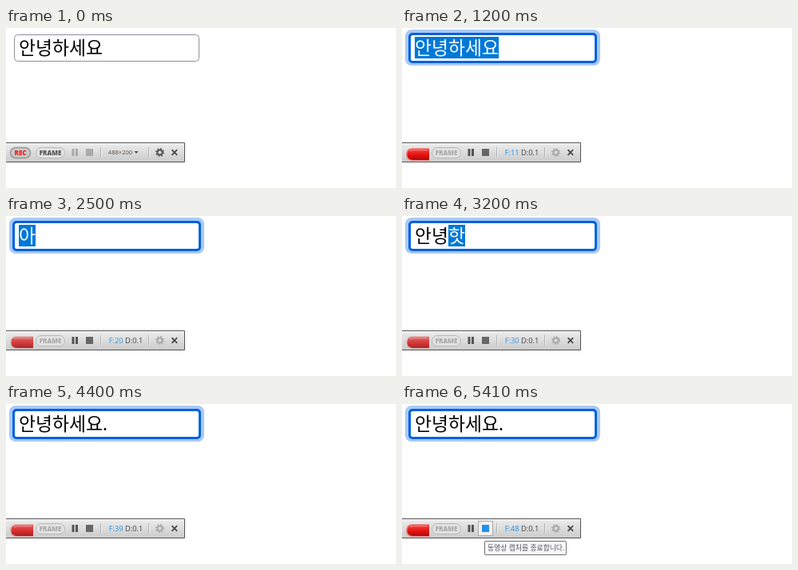
Write an HTML page that moves like this. It is 488 px wide and 200 px high and loops after 5510 ms.

```html
<!DOCTYPE html>
<html lang="ko">
<head>
<meta charset="utf-8">
<title>Text input recording</title>
<style>
  html, body { margin: 0; width: 100%; height: 100%; overflow: hidden; background: #fff; }
  svg { display: block; }
  text { white-space: pre; }
  .hangul { font-family: "Noto Sans CJK KR", "Noto Sans CJK", sans-serif; }
  .small { font-family: "Open Sans", "Noto Sans", sans-serif; text-anchor: middle; }
  .badge { font-family: "Open Sans", sans-serif; font-weight: 800; font-size: 8px; text-anchor: middle; }
</style>
</head>
<body>
<svg width="488" height="200" viewBox="0 0 488 200">
  <defs>
    <linearGradient id="barFill" x2="0" y2="1">
      <stop stop-color="#ededed"/><stop offset="1" stop-color="#cbcbcb"/>
    </linearGradient>
    <linearGradient id="redFill" x2="0" y2="1">
      <stop id="redTop"/><stop id="redMid" offset=".5"/><stop id="redLow" offset="1"/>
    </linearGradient>
  </defs>

  <rect id="border" x="10.5" y="8.5" width="231" height="33" rx="4" fill="#fff"/>
  <g id="focus">
    <rect x="4" y="2" width="244" height="45" rx="8" fill="#abc9f4"/>
    <rect x="8" y="6" width="236" height="38" rx="5" fill="#0061e0"/>
    <rect x="11" y="9" width="230" height="32" rx="2.5" fill="#fff"/>
  </g>
  <rect id="highlight" y="11" height="27" fill="#0078d7"/>
  <text class="hangul" x="16" y="32.5" font-size="22.8"><tspan id="plain"></tspan><tspan id="marked" fill="#fff"></tspan></text>
  <path id="caret" d="M128 12V37" stroke="#000"/>

  <path d="M-1 143.5H223.5V167.5H-1" fill="url(#barFill)" stroke="#555"/>
  <path d="M0 144.5H223" stroke="#f8f8f8"/>
  <path d="M118.500 149V162M178.500 149V162" stroke="#b4b4b4"/>
  <path d="M119.500 149V162M179.500 149V162" stroke="#eee"/>
  <g id="idleRec">
    <rect x="5.500" y="149.500" width="25" height="13" rx="6.500" fill="#c9c9c9" stroke="#999" stroke-width="1.500"/>
    <text class="badge" x="18" y="159" fill="#e8231c">REC</text>
  </g>
  <g id="liveRec">
    <path id="glow" d="M34 150H13Q5 150 5 158T13 166H34Z" fill="#e33"/>
    <path d="M34 151H14Q6.500 151 6.500 158T14 165H34Z" fill="url(#redFill)"/>
    <path d="M10 154Q12 152.500 15 152.500H32" fill="none" stroke="#fff" stroke-opacity=".3" stroke-width="1.500"/>
  </g>
  <rect x="37.500" y="149.500" width="36" height="13" rx="6.500" fill="#e2e2e2" stroke="#b9b9b9"/>
  <text id="frameLabel" class="badge" x="55.500" y="159">FRAME</text>
  <path id="pause" d="M82.500 151h3v9h-3zM87 151h3v9h-3z"/>
  <rect id="stopHover" x="95.500" y="146.500" width="18" height="18" fill="#f0f0f0" stroke="#aaa"/>
  <rect id="stop" x="100" y="151" width="9" height="9"/>
  <g id="size" fill="#5b4a42">
    <text class="small" x="143" y="158" font-size="7.600">488×200</text>
    <path d="M160.500 154h5l-2.500 3z"/>
  </g>
  <text id="stats" class="small" x="150" y="159" font-size="9.300"><tspan id="count"></tspan><tspan id="duration" fill="#444"></tspan></text>
  <g id="gear" fill="none" transform="translate(192.500 155.500)">
    <circle r="3.100" stroke-width="2"/>
    <circle r="4.600" stroke-width="1.700" stroke-dasharray="1.806"/>
  </g>
  <path d="M207.500 152.200l6.600 6.600m0-6.600l-6.600 6.600" stroke="#444" stroke-width="1.700"/>

  <g id="tooltip">
    <rect x="103.500" y="171.500" width="102" height="17" rx="1.500" fill="#f8f8f8" stroke="#707078"/>
    <text class="hangul" x="107" y="183.300" font-size="8.800" fill="#555">동영상 캡처를 종료합니다.</text>
  </g>
</svg>
<script>
const LOOP = 5510, CELL = 21;
const TIMES = { record: 200, hover: 700, focus: 900, select: 1000, type: 2400, done: 3700, stopHover: 4810, tooltip: 5210 };
const GREETING = "안녕하세요";
const COMPOSING = ["ㅇ", "아", "안", "안ㄴ", "안녀", "안녕", "안녕ㅎ", "안녕하", "안녕핫", "안녕하세", "안녕하셍", GREETING];
const COUNTS = [[5010, 48], [4000, 39], [3100, 30], [2100, 20], [1200, 11], [0, 0]];

const el = Object.fromEntries([...document.querySelectorAll("[id]")].map(node => [node.id, node]));
const show = (node, on) => node.setAttribute("display", on ? "inline" : "none");
const paint = (node, color, name = "fill") => node.setAttribute(name, color);
const mix = (a, b, k) => `rgb(${a.map((v, i) => Math.round(v + (b[i] - v) * k))})`;

function tick(t) {
  if (t < 200) return 0;
  if (t < 4710) return Math.min(4500, Math.floor(t / 100) * 100);
  return 4710 + Math.floor((t - 4710) / 100) * 100;
}

function inputState(t) {
  if (t < TIMES.select) return [GREETING, ""];
  if (t < TIMES.type) return ["", GREETING];
  if (t >= TIMES.done) return [GREETING + ".", ""];
  const key = Math.min(COMPOSING.length - 1, Math.floor((t - TIMES.type) / 100));
  const word = COMPOSING[key];
  return [word.slice(0, -1), word.slice(-1)];
}

function drawInput(t) {
  const [plain, marked] = inputState(t);
  el.plain.textContent = plain;
  el.marked.textContent = marked;
  el.highlight.setAttribute("x", 16 + plain.length * CELL);
  el.highlight.setAttribute("width", marked.length * CELL);
  show(el.highlight, marked);
  show(el.focus, t >= TIMES.focus);
  paint(el.border, t >= TIMES.hover ? "#676774" : "#8f8f9d", "stroke");
  show(el.caret, t >= TIMES.done && (t - TIMES.done) % 1060 < 530);
}

function drawToolbar(t) {
  const live = t >= TIMES.record;
  const hover = t >= TIMES.stopHover;
  const pulse = ((1 + Math.cos((t - 1200) / 850 * 2 * Math.PI)) / 2) ** 2;
  const count = COUNTS.find(([start]) => t >= start)[1];

  show(el.idleRec, !live);
  show(el.liveRec, live);
  show(el.size, !live);
  show(el.stats, live);
  paint(el.frameLabel, live ? "#aaa" : "#555");
  paint(el.gear, live ? "#aaa" : "#555", "stroke");
  paint(el.pause, live ? "#555" : "#aaa");
  paint(el.stop, hover ? "#2491e6" : live ? "#666" : "#aaa");
  show(el.stopHover, hover);
  show(el.tooltip, t >= TIMES.tooltip);

  paint(el.redTop, mix([226, 105, 105], [250, 70, 65], pulse), "stop-color");
  paint(el.redMid, mix([212, 62, 62], [232, 20, 18], pulse), "stop-color");
  paint(el.redLow, mix([172, 40, 40], [180, 8, 8], pulse), "stop-color");
  el.glow.setAttribute("opacity", 0.15 + 0.3 * pulse);
  paint(el.count, mix([58, 148, 216], [28, 146, 236], pulse));
  el.count.textContent = `F:${count}`;
  el.duration.textContent = count ? " D:0.1" : " D:0";
}

const start = performance.now();
function render() {
  const t = tick((performance.now() - start) % LOOP);
  drawInput(t);
  drawToolbar(t);
  requestAnimationFrame(render);
}
render();
</script>
</body>
</html>
```
